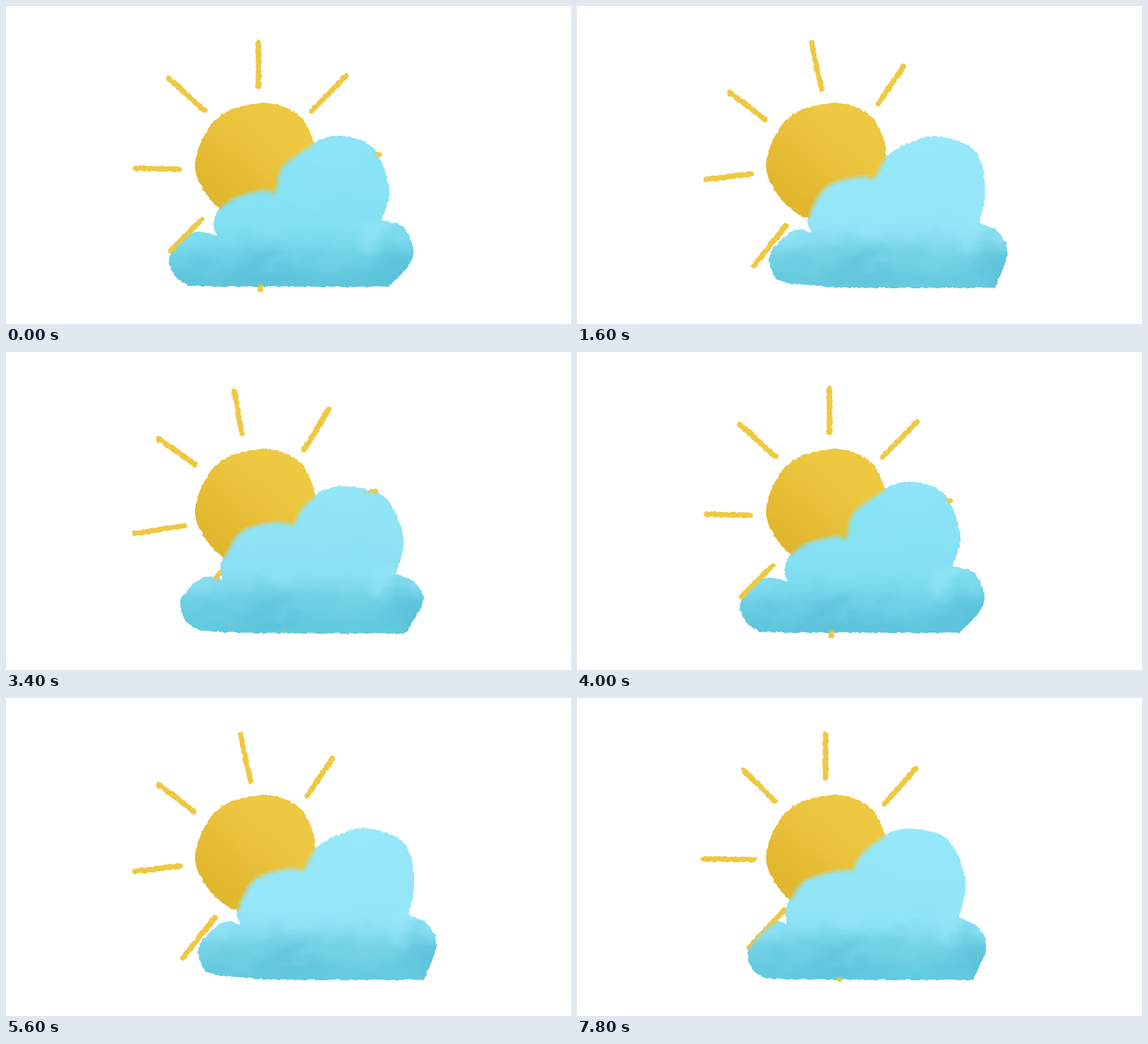
Recreate the animation shown at these times as an HTML page. Size 998 by 561 pixels, loop 8010 ms.

```html
<!DOCTYPE html>
<html lang="en">
<head>
<meta charset="utf-8">
<title>Sun and cloud</title>
<style>
html, body { margin: 0; width: 100%; height: 100%; overflow: hidden; background: #fff; }
svg { display: block; width: 100vw; height: 100vh; }
</style>
</head>
<body>
<svg viewBox="0 0 998 561">
  <defs>
    <filter id="rough" filterUnits="userSpaceOnUse" x="0" y="0" width="998" height="561" color-interpolation-filters="sRGB">
      <feTurbulence type="fractalNoise" baseFrequency=".14" numOctaves="2" seed="4"/>
      <feDisplacementMap in="SourceGraphic" scale="5" xChannelSelector="R" yChannelSelector="G"/>
    </filter>
    <filter id="wash" filterUnits="userSpaceOnUse" x="-60" y="150" width="640" height="420" color-interpolation-filters="sRGB">
      <feTurbulence type="fractalNoise" baseFrequency=".012 .022" numOctaves="4" seed="9"/>
      <feDisplacementMap in="SourceGraphic" scale="60" xChannelSelector="R" yChannelSelector="G"/>
      <feGaussianBlur stdDeviation="2"/>
    </filter>
    <filter id="blur" filterUnits="userSpaceOnUse" x="-60" y="0" width="1058" height="600">
      <feGaussianBlur stdDeviation="3"/>
    </filter>
    <filter id="haze" filterUnits="userSpaceOnUse" x="-60" y="150" width="640" height="420">
      <feGaussianBlur stdDeviation="10"/>
    </filter>
    <linearGradient id="gold" gradientUnits="userSpaceOnUse" x1="470" y1="210" x2="375" y2="325">
      <stop stop-color="#efc842"/><stop offset=".45" stop-color="#e9c13a"/><stop offset="1" stop-color="#e1b72e"/>
    </linearGradient>
    <linearGradient id="sky" gradientUnits="userSpaceOnUse" x1="0" y1="230" x2="0" y2="490">
      <stop/><stop offset=".61"/><stop offset=".79"/><stop offset=".96"/>
    </linearGradient>
    <path id="cloud"/>
    <clipPath id="inside"><use href="#cloud"/></clipPath>
    <mask id="edge" maskUnits="userSpaceOnUse" x="0" y="0" width="998" height="561">
      <use href="#cloud" fill="none" stroke="#fff" stroke-width="7" filter="url(#blur)"/>
    </mask>
  </defs>
  <g filter="url(#rough)">
    <g id="sun">
      <path id="rays" fill="none" stroke="#f0c841" stroke-width="9.5" stroke-linecap="round"/>
      <path id="disc" fill="url(#gold)"/>
    </g>
    <g clip-path="url(#inside)">
      <g id="paint">
        <rect x="-60" y="150" width="640" height="420" fill="url(#sky)" filter="url(#wash)"/>
        <g filter="url(#wash)"><g filter="url(#haze)">
          <ellipse cx="150" cy="466" rx="70" ry="15" fill="#50bad3" opacity=".4"/>
          <ellipse cx="412" cy="462" rx="34" ry="28" fill="#50bad3" opacity=".5"/>
          <ellipse cx="362" cy="403" rx="34" ry="22" fill="#97e8f9" opacity=".6"/>
        </g></g>
      </g>
      <use href="#sun" mask="url(#edge)"/>
    </g>
  </g>
</svg>
<script>
const $ = id => document.getElementById(id);
const STEP = 200, LOOP = 8010, CYCLE = 20;
const CX = 446, CY = 285;
const KEY_AT = [0, 8, 14, 19, 20];
const TURN = [0, 35, 64.5, 88.7, 90];

// Cloud outlines: four lobes that share their corner points.
const CLOUDS = [
  [322,494, 297,474, 290,440, 330,400, 372,405, 367,378, 392,341, 452,322, 473,326,
   487,281, 543,241, 592,229, 650,252, 677,325, 663,377, 704,392, 718,445, 676,495],
  [372,489, 349,477, 341,438, 382,396, 413,399, 408,368, 438,317, 495,298, 524,300,
   545,266, 590,240, 640,230, 703,256, 721,320, 711,383, 745,399, 760,438, 738,497],
  [362,487, 328,466, 319,432, 350,400, 397,404, 397,368, 433,307, 484,291, 541,301,
   552,273, 580,252, 622,246, 695,271, 727,345, 711,396, 743,411, 757,437, 715,495],
  [335,495, 311,480, 303,440, 345,396, 371,399, 370,368, 400,320, 465,301, 483,302,
   505,268, 548,239, 595,231, 655,250, 686,320, 675,388, 708,404, 723,440, 700,497]
];
const LOBES = [[0, 4], [4, 8], [8, 14], [14, 17]];
const SHADES = [
  ['8de5f9', '82e0f2', '72d4e8', '5fc6dd'],
  ['97e8f9', '93e6f8', '78d4e7', '66cbdf'],
  ['8fe3f5', '80dcee', '6acfe4', '62c9df'],
  ['96e8f9', '90e5f7', '75d3e6', '64cadf']
];
// Visible rays as inner and outer ends, clockwise from the given ray.
const RAYS = [
  { first: 4, ends: [[449,430,449,500], [346,376,291,432], [306,288,228,286], [351,185,288,128],
                     [446,142,446,64], [540,185,601,123], [580,272,660,262]] },
  { first: 4, ends: [[369,387,312,459], [308,296,228,306], [332,200,270,153], [432,146,414,65],
                     [532,173,576,107]] },
  { first: 3, ends: [[400,410,382,485], [325,336,245,372], [317,228,242,199], [385,155,352,87],
                     [498,156,520,75], [574,226,645,193]] },
  { first: 2, ends: [[460,420,463,496], [366,374,304,440], [313,285,223,284], [349,182,294,127],
                     [439,141,439,65], [543,187,599,124]] }
];
const SUN = [452,171, 498,181, 530,208, 546,262, 535,330, 480,372, 410,375,
             370,350, 345,318, 334,285, 340,252, 362,210, 395,184];

const mix = (a, b, p) => a + (b - a) * p;
const mixAll = (a, b, p) => a.map((v, i) => mix(v, b[i], p));
const pairs = a => a.flatMap((v, i) => i % 2 ? [] : [[v, a[i + 1]]]);
const rgb = hex => [0, 2, 4].map(i => parseInt(hex.slice(i, i + 2), 16));

// Smooth curve through the points, without the opening move.
function curve(pts, closed) {
  const n = pts.length;
  const at = i => closed ? pts[(i + n) % n] : pts[Math.max(0, Math.min(n - 1, i))];
  let d = '';
  for (let i = 0; i < (closed ? n : n - 1); i++) {
    const [a, b, c, e] = [-1, 0, 1, 2].map(k => at(i + k));
    d += 'C' + [0, 1].map(k => b[k] + (c[k] - a[k]) / 6) + ' ' +
         [0, 1].map(k => c[k] - (e[k] - b[k]) / 6) + ' ' + c;
  }
  return d;
}

// Angle clockwise from the top, near the expected one, and radius.
function polar(x, y, near) {
  const a = Math.atan2(x - CX, CY - y) * 180 / Math.PI;
  return [a + 360 * Math.round((near - a) / 360), Math.hypot(x - CX, y - CY)];
}

function rayAt(key, k) {
  const near = 45 * k + TURN[key];
  if (key == 4) { key = 0; k += 2; }
  const { first, ends } = RAYS[key];
  const e = ends[(k - first + 8) % 8];
  return e ? [...polar(e[0], e[1], near), ...polar(e[2], e[3], near)]
           : [near, 140, near, 205];
}

function point(a, r) {
  a *= Math.PI / 180;
  return [CX + r * Math.sin(a), CY - r * Math.cos(a)];
}

function draw(f) {
  let i = 0;
  while (f >= KEY_AT[i + 1]) i++;
  const p = (f - KEY_AT[i]) / (KEY_AT[i + 1] - KEY_AT[i]), j = (i + 1) % 4;

  let rays = '';
  for (let k = 0; k < 8; k++) {
    const [a, r, b, s] = mixAll(rayAt(i, k), rayAt(i + 1, k), p);
    rays += 'M' + point(a, r) + 'L' + point(b, s);
  }
  $('rays').setAttribute('d', rays);

  // The cloud swings a little further right between its second and third pose.
  const push = 20 * Math.max(0, Math.min((f - 8) / 2, (14 - f) / 4));
  const pts = pairs(mixAll(CLOUDS[i], CLOUDS[j], p)).map(([x, y]) => [x + push, y]);
  const outline = LOBES.map(([a, b]) => curve(pts.slice(a, b + 1))).join('');
  $('cloud').setAttribute('d', 'M' + pts[0] + outline + 'L' + [pts[0][0] + 90, pts[17][1]] + 'Z');
  $('paint').setAttribute('transform', `translate(${pts[2][0]})`);
  $('sky').querySelectorAll('stop').forEach((stop, n) => {
    const c = mixAll(rgb(SHADES[i][n]), rgb(SHADES[j][n]), p).map(Math.round);
    stop.setAttribute('stop-color', `rgb(${c})`);
  });
}

const disc = pairs(SUN);
$('disc').setAttribute('d', 'M' + disc[0] + curve(disc, true) + 'Z');

let shown = -1;
function tick() {
  const f = Math.min(39, Math.floor(performance.now() % LOOP / STEP)) % CYCLE;
  if (f != shown) draw(shown = f);
  requestAnimationFrame(tick);
}
tick();
</script>
</body>
</html>
```
